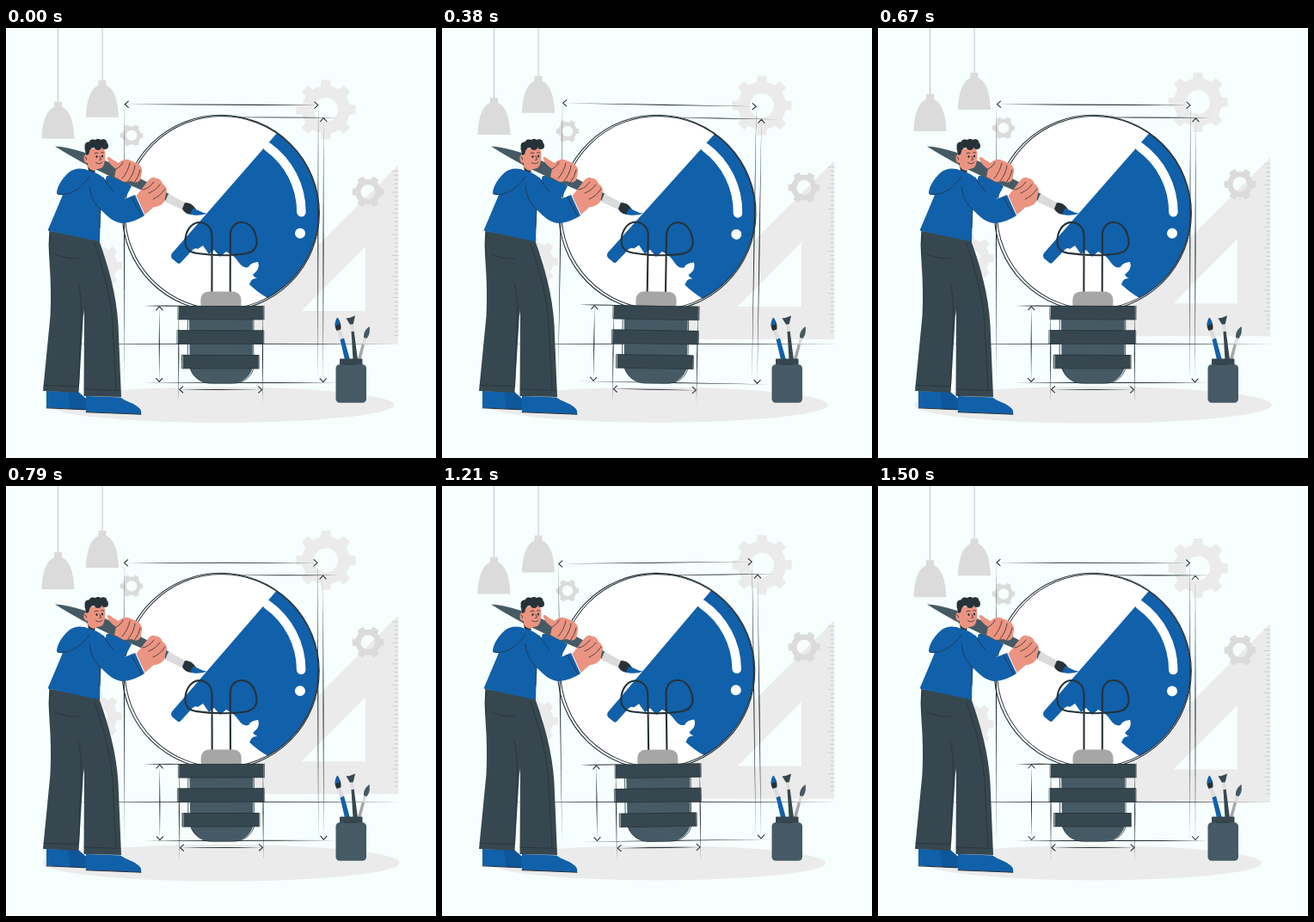
An HTML page with a canvas for the animation above (1540 ms loop, 500 by 500 pixels).

```html
<!DOCTYPE html>
<html lang="en">
<head>
<meta charset="utf-8">
<title>Painting a light bulb</title>
<style>
html, body { margin: 0; width: 100%; height: 100%; overflow: hidden; background: #f6fffd; }
canvas { display: block; width: 500px; height: 500px; }
</style>
</head>
<body>
<canvas id="stage" width="500" height="500"></canvas>
<script>
const ctx = document.getElementById('stage').getContext('2d');
const LOOP = 1540, STEPS = 37, STEP_MS = 1000 / 24;
const BG = '#f6fffd', BLUE = '#1160aa', BLUE_DARK = '#0f579b', INK = '#263238', DARK = '#37474f',
  SLATE = '#455a64', SKIN = '#eb9481', PALE = '#ebebeb', LIGHT = '#dbdbdb', GRAY = '#a6a6a6';

function fill(path, color) {
  ctx.fillStyle = color;
  ctx.fill(typeof path === 'string' ? new Path2D(path) : path, 'evenodd');
}

function stroke(path, color = INK, width = 0.9) {
  ctx.strokeStyle = color;
  ctx.lineWidth = width;
  ctx.lineCap = ctx.lineJoin = 'round';
  ctx.stroke(typeof path === 'string' ? new Path2D(path) : path);
}

function ellipse(x, y, rx, ry = rx, angle = 0) {
  const p = new Path2D();
  p.ellipse(x, y, rx, ry, angle, 0, Math.PI * 2);
  return p;
}

function box(x, y, w, h, r = 0) {
  const p = new Path2D();
  p.roundRect(x, y, w, h, r);
  return p;
}

// Hand-drawn line, thick in the middle and thin at both ends.
function taper(x1, y1, x2, y2, width = 1.15) {
  const len = Math.hypot(x2 - x1, y2 - y1);
  const nx = (y2 - y1) / len * width, ny = (x1 - x2) / len * width;
  const mx = (x1 + x2) / 2, my = (y1 + y2) / 2;
  fill(`M${x1} ${y1}Q${mx + nx} ${my + ny} ${x2} ${y2}Q${mx - nx} ${my - ny} ${x1} ${y1}Z`, INK);
}

function arrowHead(x, y, turn) {
  ctx.save();
  ctx.translate(x, y);
  ctx.rotate(turn * Math.PI / 2);
  stroke('M4 -3.6L0 0L4 3.6', INK, 1.1);
  ctx.restore();
}

function gear(x, y, r, hole, teeth, color) {
  const p = new Path2D(), body = r * 0.8, pitch = Math.PI * 2 / teeth;
  const at = (radius, a) => p.lineTo(x + radius * Math.cos(a), y + radius * Math.sin(a));
  for (let i = 0; i < teeth; i++) {
    const a = i * pitch;
    at(body, a - pitch * 0.27);
    at(r, a - pitch * 0.19);
    at(r, a + pitch * 0.19);
    at(body, a + pitch * 0.27);
    p.arc(x, y, body, a + pitch * 0.27, a + pitch * 0.73);
  }
  p.closePath();
  p.moveTo(x + hole, y);
  p.arc(x, y, hole, 0, Math.PI * 2);
  fill(p, color);
}

function lamp(x, bottom) {
  ctx.save();
  ctx.translate(x, bottom);
  stroke('M0 -150V-40', '#c4c4c4', 1);
  fill('M-4.5 -43H4.5V-37C13 -34 18.5 -20 19 0H-19C-18.5 -20 -13 -34 -4.5 -37Z', LIGHT);
  ctx.restore();
}

function setSquare() {
  fill('M456 160V367.5H248.5ZM418 254.5V329.5H343.5Z', PALE);
  for (let i = 0; i < 40; i++) {
    stroke(`M456 ${167 + i * 4.9}h${i % 5 ? -4 : -7}`, '#c0c0c0', 0.7);
  }
}

function floating(dy) {
  ctx.save();
  ctx.translate(0, dy);
  lamp(60.5, 129.3);
  lamp(112, 104.2);
  gear(372, 95.5, 35, 14, 8, PALE);
  gear(107, 277, 28, 11, 8, PALE);
  setSquare();
  gear(146, 125.5, 13.5, 6.2, 6, LIGHT);
  gear(421, 191, 18.7, 8.5, 6, LIGHT);
  ctx.restore();
}

function highlight() {
  const arc = new Path2D();
  arc.arc(250, 214, 93.3, -0.95, 0);
  stroke(arc, '#fff', 10.5);
  fill(ellipse(342, 238.5, 6), '#fff');
}

function paintedGlass() {
  fill(ellipse(250, 215, 113.5, 113), '#fff');
  ctx.save();
  ctx.clip(ellipse(250, 215, 113.5, 113));
  fill('M315 122L193 262Q191 265 193 268L199 273Q201 275 203 273L217 258Q220 255 223 257L229 253L236 263' +
    'L242 258L249 266L256 260L263 264Q268 268 271 273Q276 280 282 278Q284 273 293 272Q295 277 292 282' +
    'L287 287Q289 290 292 291Q287 291 285 294L283 298Q292 307 306 315L370 310V150Z', BLUE);
  highlight();
  ctx.restore();
  stroke(ellipse(249.7, 215.3, 114.6, 114), INK, 1.1);
  stroke(ellipse(250.8, 214.7, 112.6, 112.2), INK, 1);
}

function bulbBase() {
  stroke('M239.5 308V241C239 231 232 226 224 226C214 227 208 238 208.5 249C209 258 214 261 222 262' +
    'C240 264.5 262 265 278 262.5C288 261 292 256 291.5 247C290 234 283 226 274 226' +
    'C266 226 261 232 260.8 241V308', INK, 2.1);
  fill(box(226.5, 306.5, 47, 24, 9), GRAY);
  fill('M213 330H287V395C284 406 275 413 263 413H239C227 413 217 406 214 395Z', SLATE);
  stroke('M211.5 338V380M214.5 396C218 407 228 413.3 239 413.3H263C275 413.3 285 407 288 396V338', INK, 0.8);
  for (const [x, y, w] of [[201, 323, 98], [200, 351.3, 99.5], [206, 380, 88]]) {
    fill(box(x, y, w, 16), DARK);
    stroke(box(x - 0.5, y + 0.5, w + 1, 15.5), INK, 0.7);
  }
  stroke('M300.3 323V339M204.5 380V396', INK, 0.6);
}

function dimensions() {
  taper(138, 89, 363, 89.5);
  taper(137.5, 79, 137.5, 414);
  taper(362.8, 79, 362.8, 410);
  taper(369, 105, 369, 412);
  taper(250, 103.8, 388, 104);
  taper(160, 412.4, 385, 412.4);
  taper(178.5, 324, 178.5, 411);
  taper(160, 323.3, 214, 323.3);
  taper(202, 420.5, 298, 420.5);
  taper(201, 322, 201, 436);
  taper(298.7, 322, 298.7, 436);
  arrowHead(138, 89, 0);
  arrowHead(362.5, 89.5, 2);
  arrowHead(369, 104.5, 1);
  arrowHead(369, 411.5, 3);
  arrowHead(178.5, 324, 1);
  arrowHead(178.5, 411.5, 3);
  arrowHead(202, 420.5, 0);
  arrowHead(298, 420.5, 2);
}

function bulb(degrees) {
  ctx.save();
  ctx.translate(256, 257);
  ctx.rotate(degrees * Math.PI / 180);
  ctx.translate(-256, -257);
  paintedGlass();
  dimensions();
  bulbBase();
  ctx.restore();
}

function brushPot() {
  fill('M388.5 362L393 360.5L400 386H394Z', BLUE);
  fill('M384.5 351.5L389 350L393 360.5L388.5 362Z', LIGHT);
  fill('M384.5 352C381 346 383 341 385 337C389 341 390 346 389.3 350.5Z', INK);
  fill('M383 347C382 342 384 339 385.5 336.5C387.5 339 388 342 388 345Q385 344 383 347Z', BLUE);
  fill('M401.5 353L404.7 352.5L409 386H403.5Z', DARK);
  fill('M400 344.5L403.8 344L404.7 352.5L401.5 353Z', LIGHT);
  fill('M395.5 337.5Q401 337 406 334.5L403.8 344.3L400 344.7Z', DARK);
  fill('M414 367L417 368L412.5 386H408.5Z', GRAY);
  fill('M416.3 359.5L419.3 360.5L417 368L414 367Z', LIGHT);
  fill('M416 360C415.5 354 418.5 350 422.5 347C423.5 353 422.5 357 419.5 361Z', SLATE);
  fill(box(388, 384.5, 26.5, 9, 1), DARK);
  fill(box(383.5, 391.3, 35.5, 44.5, 4.5), SLATE);
  stroke('M394 391.3H407', INK, 0.7);
}

function legs() {
  fill('M47 422L83 423L93 431V444L47 441.5Z', BLUE);
  fill('M72 423H84L93 431V444L75 443Z', BLUE_DARK);
  fill('M93 428L133 429.5C140 435 150 436 156 443Q158 446 157 449.3L93 446.5Z', BLUE);
  stroke('M47 441.8L92 443.8M93 446.7L157 449.2', INK, 1);
  fill('M50.5 236L109 247L92 300L84.5 424L43 422L51.5 335Q53 305 50.5 272Q49 250 50.5 236Z', DARK);
  fill('M50.5 236L108.5 248C119 277 128.5 310 130.5 345L134 429L90.5 428L91 335C88 305 78 285 75 268L50 258Z', DARK);
  stroke('M84 297Q88 312 87.5 335L84.5 416M44 415.5L84 416.5M91 420L133 421.5' +
    'M103 251C113 282 122 310 124 345L128 420M57 263Q67 268 84 268M52 240Q49 250 51 262', INK, 0.8);
}

function head() {
  fill('M94 157L105 160L103 169L96 166Z', INK);
  fill('M95 156L106 160L104 166Q98 166 95 161Z', SKIN);
  fill('M93 141L114 139C116.5 148 115.5 158 112 162C106 166 97 164 94.5 157C90 157 89 149 92.5 147Z', SKIN);
  for (const [x, y, r] of [[96, 137, 4.5], [101, 134.5, 5], [107, 134, 5], [113, 133.8, 4.6], [115, 137, 4], [107, 137.5, 4.5], [94.5, 140, 3]]) {
    fill(ellipse(x, y, r), INK);
  }
  fill('M91.8 140L98 140L96 147L93 148Z', INK);
  fill(ellipse(105.5, 149.5, 1.1, 1.6), INK);
  fill(ellipse(112, 149, 1.1, 1.6), INK);
  stroke('M103 145.8Q105 144.5 107 145.3M110.5 145Q112.5 144 114 145M109 149L110.5 153L108.5 153.5' +
    'M104.5 156.5Q109 159.5 112 156M92 150Q94 150.5 93.5 153', INK, 0.8);
}

function paintbrush() {
  fill('M57 137.5C77 139 101 147 126 159L190 193L186 201L122 173C99 162 78 151 57 137.5Z', SLATE);
  fill('M189 192.5L209 203.5L205.5 211.5L185 202Z', LIGHT);
  fill('M208 203C215 203 219 207 222 213L215 217C209 216 206 213 205 210Z', INK);
  fill('M217.5 209.5C223 211.5 228 215 233.5 215.5C228 218 220 218.5 214 216.5Z', BLUE);
}

function painter() {
  legs();
  fill('M111 190L117 172L128 172L146 184L138 199L118 196Z', BLUE);
  paintbrush();
  head();
  fill('M117.5 151Q119 148.5 124 153L131 157Q136 152 142 153L152 157Q159 161 158 168L156 177Q151 182 146 178' +
    'L137 179L126 173L128 164Q119 158 117.5 151Z', SKIN);
  stroke('M128 164Q134 161 136 156M135 175Q142 167 144 157M142 178Q149 169 150 160M149 180Q155 172 156 165', INK, 0.8);
  fill('M97 166C88 162 79 163 73 168C65 175 59 185 59 192.5Q62 195 66 194L48.5 235.5L109 248.5L110 211' +
    'C119 220 126 227 137 227Q151 225 161 218L150 194L138 199C127 195 122 184 113 174Q106 168 97 166Z', BLUE);
  stroke('M60 193C75 196 87 186 97 173M97 184C98 196 104 206 110 211M110 211L109 232M146 197L158 219M113 174Q118 183 125 190', INK, 0.8);
  fill('M151.5 195L158 187L164 179Q169 172 174 174.5Q180 175 182 181Q189 186 186 193L184 202Q179 208 172 208L161.5 217Z', SKIN);
  stroke('M159 188Q166 187 172 179M166 192Q174 189 179 182M171 199Q179 196 185 187', INK, 0.8);
}

// Linear interpolation through [position, value] stops.
function track(p, stops) {
  const i = Math.max(1, stops.findIndex(s => s[0] >= p));
  const [a, from] = stops[i - 1], [b, to] = stops[i];
  return from + (to - from) * (p - a) / (b - a);
}

const FLOAT = [[0, 0], [0.5, -10], [1, 0]];
const SWAY = [[0, 0], [0.25, 1], [0.75, -1], [1, 0]];
const PULSE = [[0, 1], [0.1, 1.1], [0.3, 1], [0.4, 1], [0.5, 1.1], [0.6, 1], [1, 1]];

function draw(ms) {
  const step = Math.min(STEPS - 1, Math.floor((ms + 5) / STEP_MS));
  const p = (step + 1) / STEPS;
  const pulse = track(p, PULSE);
  fill(box(0, 0, 500, 500), BG);
  floating(track(p, FLOAT));
  taper(60, 367.2, 460, 367.2);
  fill(ellipse(250, 438.2, 195.8 * pulse, 20.2 * pulse), PALE);
  bulb(track(p, SWAY));
  brushPot();
  painter();
}

const start = performance.now();
function tick() {
  draw((performance.now() - start) % LOOP);
  requestAnimationFrame(tick);
}
tick();
</script>
</body>
</html>
```
